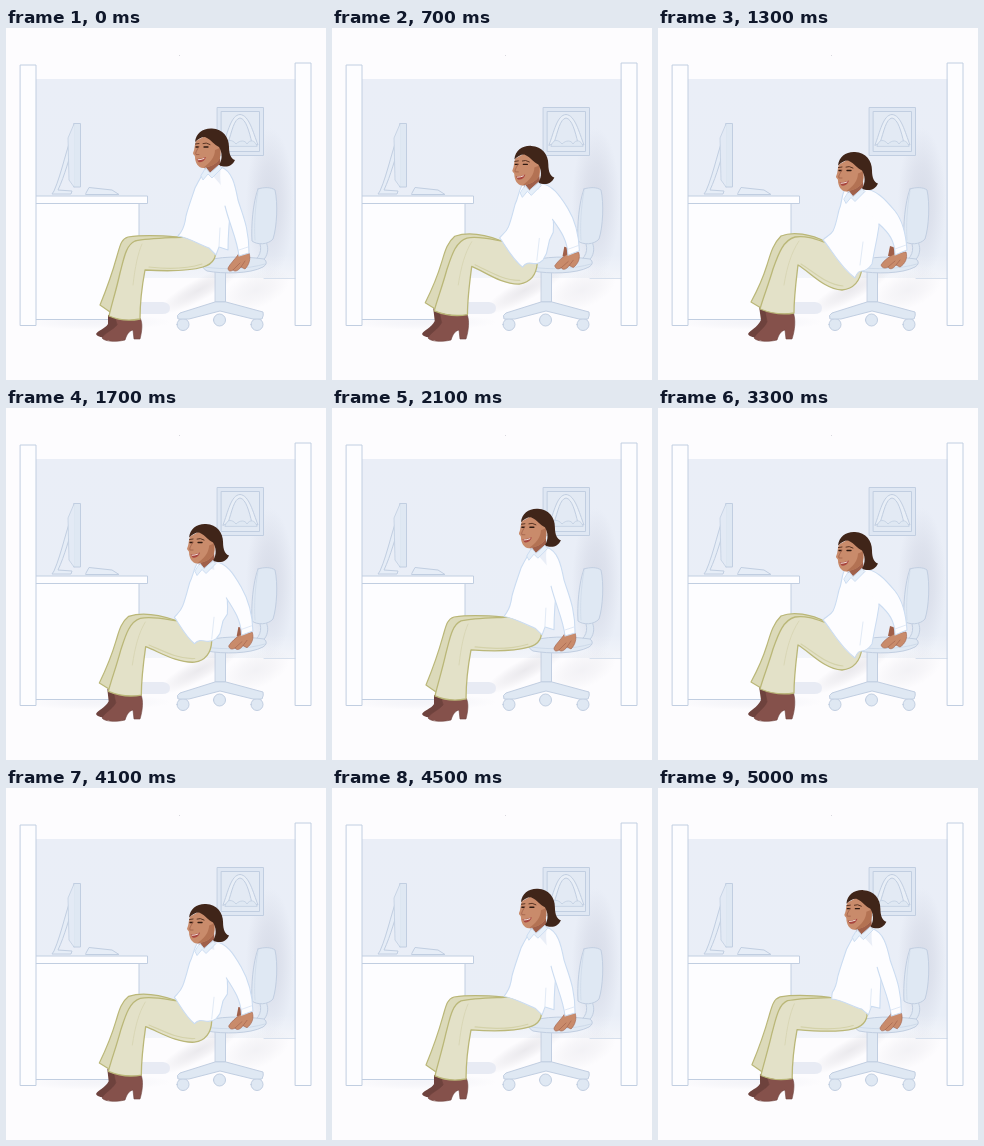
An HTML page with a canvas that plays this animation: 320x352 px, repeating every 5100 ms.

```html
<!DOCTYPE html>
<html lang="en">
<head>
<meta charset="utf-8">
<title>Chair dip</title>
<style>
html, body { margin: 0; width: 100%; height: 100%; overflow: hidden; background: #fdfcfe; }
canvas { display: block; width: 320px; height: 352px; }
</style>
</head>
<body>
<canvas id="stage"></canvas>
<script>
const canvas = document.getElementById('stage');
const ctx = canvas.getContext('2d');
const ratio = window.devicePixelRatio || 1;
canvas.width = 320 * ratio;
canvas.height = 352 * ratio;

const LOOP = 5100, STEP = 100, CYCLE = 2400;
const LINE = '#c1cee1', PALE = '#dfe8f3', WHITE = '#fdfdff';
const SKIN = '#c98b6b', SKIN_DARK = '#a0604a', HAIR = '#402519';
const PANTS = '#e3e1c8', SEAM = '#bab778', BOOT = '#85514b', BOOT_DARK = '#6e423d';
const SHIRT_LINE = '#cbdcf1';

// [time within a cycle, how far the body is lowered]
const DIP = [[0, 0], [200, .07], [400, .29], [600, .57], [700, .74], [800, .9], [900, 1],
  [1300, 1], [1500, .88], [1700, .66], [1800, .47], [1950, .17], [2100, .01], [2400, 0]];

function dipAt(ms) {
  const t = ms % CYCLE;
  const i = DIP.findIndex(k => k[0] > t);
  const [t0, d0] = DIP[i - 1], [t1, d1] = DIP[i];
  return d0 + (d1 - d0) * (t - t0) / (t1 - t0);
}

// Blend two path strings that share the same commands.
function morph(up, down, d) {
  const ends = down.match(/-?[\d.]+/g);
  let i = 0;
  return up.replace(/-?[\d.]+/g, n => (+n + (ends[i++] - n) * d).toFixed(2));
}

function shape(path, fill, stroke, width = 1) {
  const p = new Path2D(path);
  if (fill) { ctx.fillStyle = fill; ctx.fill(p); }
  if (stroke) { ctx.strokeStyle = stroke; ctx.lineWidth = width; ctx.stroke(p); }
}

function box(x, y, w, h, fill, stroke = LINE) {
  shape(`M${x} ${y}h${w}v${h}h${-w}Z`, fill, stroke);
}

function disc(x, y, r, fill, stroke = LINE) {
  shape(`M${x - r} ${y}a${r} ${r} 0 1 0 ${2 * r} 0a${r} ${r} 0 1 0 ${-2 * r} 0Z`, fill, stroke);
}

function haze(x, y, rx, ry, angle, rgb, alpha) {
  ctx.save();
  ctx.translate(x, y);
  ctx.rotate(angle);
  ctx.scale(rx, ry);
  const g = ctx.createRadialGradient(0, 0, 0, 0, 0, 1);
  g.addColorStop(0, `rgba(${rgb},${alpha})`);
  g.addColorStop(.5, `rgba(${rgb},${alpha * .6})`);
  g.addColorStop(1, `rgba(${rgb},0)`);
  ctx.fillStyle = g;
  ctx.fillRect(-1, -1, 2, 2);
  ctx.restore();
}

function drawRoom() {
  ctx.fillStyle = '#fdfcfe';
  ctx.fillRect(0, 0, 320, 352);
  const wall = ctx.createLinearGradient(0, 51, 0, 251);
  wall.addColorStop(0, '#eaeef7');
  wall.addColorStop(.88, '#e9eef7');
  wall.addColorStop(1, '#f3f5fa');
  ctx.fillStyle = wall;
  ctx.fillRect(30, 51, 260, 199);
  ctx.fillStyle = '#d8d8de';
  ctx.fillRect(173, 27, 1, 1);

  ctx.save();
  ctx.beginPath();
  ctx.rect(30, 51, 260, 260);
  ctx.clip();
  haze(264, 175, 24, 75, 0, '196,200,216', .5);
  haze(193, 262, 46, 11, -.5, '185,183,192', .27);
  haze(250, 262, 36, 18, -.4, '200,200,210', .2);
  ctx.restore();
  haze(90, 294, 75, 8, 0, '205,210,225', .2);
  shape('M258 250.5H290', null, '#d6dfec');

  // picture on the wall
  box(211.5, 79.5, 46, 48, '#dfe7f3');
  box(215.5, 83.5, 38, 40, '#e3eaf4');
  shape('M217 117C222 104 225 87 234 86.5C243 87 247 104 252 117L246 115C243 103 240 91 234 90C228 91 226 103 222 115Z', '#e9eff7', LINE);
  shape('M219 118C221 111 226 111 230 116C234 112 239 112 241 116C244 111 249 112 251 118Z', PALE, LINE, .8);

  // desk
  shape('M133 274H157Q164 275 164 280Q164 286 156 286H133Z', '#e8ebf4');
  box(29.5, 175.5, 103.5, 116, WHITE);
  box(29.5, 168, 112, 7.5, WHITE);

  // monitor and keyboard
  shape('M67 106C61 117 56 145 48 163L46 166H65L66 163L52 162C59 147 63 130 67 119Z', '#e6edf7', LINE);
  shape('M68 95.5H74.5V159H68Z', PALE, LINE);
  shape('M68 96L62 110L63 152L68 159', '#e3eaf5', LINE, .8);
  shape('M80 165L83 159.5L106 162L113 166.5H80Z', '#e6edf7', LINE);

  box(14.5, 37, 15.5, 260.5, WHITE);
  box(289.5, 35, 15.5, 262.5, WHITE);
}

function drawChair() {
  shape('M259 212C265 222 261 232 249 239L244 236C254 230 257 222 253 213Z', PALE, LINE);
  shape('M252 161C258 159 265 159 269 162C272 175 271 199 267 211C262 217 251 217 246 213C245 198 247 174 252 161Z', PALE, LINE);
  shape('M252 163C249 180 248 197 249 212', null, '#cfdbea', .8);
  shape('M209.5 243H219.5V274H209.5Z', PALE, LINE);
  disc(177, 296.5, 6, PALE);
  disc(213.5, 292, 6, PALE);
  disc(251, 296.5, 6, PALE);
  shape('M209 274L174 285Q170 287 172 291H183L214 283L247 291H256Q258 287 257 284L220 274Z', PALE, LINE);
  shape('M197 234C210 228 237 228 258 231Q263 235 257 239C244 246 217 246 201 243Q195 240 197 234Z', PALE, LINE);
  shape('M199 239C218 242 242 241 259 236', null, '#cad7e8', .8);
}

function drawLegs(blend) {
  // far boot, near boot
  shape(blend(
    'M102 287L117 289L115 304L106 307C99 310 92 310 90 306C92 302 99 301 102 296Z',
    'M101 278L117 281L115 303L106 307C99 310 92 310 90 306C92 302 99 300 103 292Z'), BOOT_DARK);
  shape(blend(
    'M109 289L134 290C137 295 136 303 134 311L128 311L127 302C123 303 121 306 119 312C111 314 99 314 96 310C98 305 107 302 111 297Z',
    'M107 282L135 284C138 291 137 302 134 311L128 311L127 302C123 303 121 306 119 312C111 314 99 314 96 310C98 305 106 301 109 294Z'), BOOT, BOOT_DARK, .6);
  // far leg, near leg
  shape(blend(
    'M172 209C150 207 135 207 122 209C115 211 114 218 111 228C106 246 101 260 94 277L104 284L134 260L139 218Z',
    'M168 214C153 206 135 203 123 208C114 217 112 228 109 237C105 250 99 263 93 274L103 280L134 258L140 218Z'), '#dcdaba', SEAM, 1.2);
  shape(blend(
    'M178 209C160 210 142 210 129 213C120 217 118 230 114 245C110 263 106 275 103 288C112 292 124 293 134 291C134 275 136 258 139 242C155 243 180 244 197 239C208 236 211 228 209 220Z',
    'M169 215C160 212 149 207 137 209C125 212 120 227 115 241C110 258 105 270 102 281C112 285 125 287 136 285C136 268 138 254 140 237C152 244 166 261 184 262C194 261 202 255 204 240Z'), PANTS, SEAM, 1.3);
  shape(blend('M136 216C132 225 129 239 127 257', 'M141 213C133 225 129 239 126 257'), null, '#d6d4b0', .8);
  shape(blend('M143 239C160 241 180 241 196 236', 'M143 236C156 244 169 257 185 258'), null, '#d4d2aa', 1.2);
}

function drawTorso(blend) {
  shape(blend('M233 221L239 221L240 230L232 229Z', 'M232 218L238 220L239 229L230 228Z'), SKIN_DARK);
  shape(blend(
    'M201 141C196 146 193 152 189 160C185 172 182 180 180 188C179 196 177 201 175 204C174 206 173 206 172 208C184 210 194 217 203 220L210 227L213 219L222 222C222 205 224 185 226 170C228 150 224 141 215 138Z',
    'M186 163C183 170 184 176 181 182C179 190 178 197 175 203C172 208 168 208 165 212C172 219 181 238 197 250L202 237L205 249L214 236C216 225 219 210 221 198C223 175 215 163 205 160Z'), WHITE, SHIRT_LINE, 1.1);
  shape(blend('M214 200L213 219', 'M205 214L202 237'), null, '#e1eaf6', 1);
}

function drawArm(blend) {
  shape(blend(
    'M232 227L243 225C245 231 243 237 239 241L235 239C232 243 229 244 227 242C224 244 222 243 222 240C224 236 229 231 232 227Z',
    'M236 226L248 224C250 230 247 236 242 239L238 237C235 241 232 242 230 239C227 241 224 240 223 237C226 232 231 229 236 226Z'), SKIN, SKIN_DARK, .6);
  shape(blend('M227 242L234 235M235 239L239 233', 'M230 239L237 233M238 237L242 232'), null, SKIN_DARK, .6);
  const outer = blend(
    'M215 139C226 143 229 156 232 172C237 188 243 200 243 225L233 228C231 211 224 198 219 178',
    'M205 161C218 161 227 171 237 183C245 193 248 207 249 222L237 227C237 213 231 205 221 196');
  const shoulder = blend('C215 162 213 149 215 139Z', 'C211 187 203 172 205 161Z');
  shape(outer + shoulder, WHITE);
  shape(outer, null, SHIRT_LINE, 1.1);
  shape(blend('M233 222L242 219', 'M237 221L248 217'), null, '#d8e4f4', .8);
}

function drawHead(d) {
  ctx.save();
  ctx.translate(-9 * d, 23.5 * d);
  shape('M198 135L214 130L215 141L204 146L199 142Z', SKIN_DARK);
  shape('M190 113C188 119 189 121 187 125C187 127 189 127 189 129C189 134 192 140 197 140C204 139 211 136 214 130C217 120 212 109 201 107Z', SKIN);
  shape('M209 122C209 129 204 135 197 140C204 139 211 136 214 130L214 120Z', '#b37253');
  shape('M189 114C190 105 197 100 206 100.5C217 101 223 109 223 119C223 126 225 131 229 132C226 139 219 140 213 137C217 131 216 124 213 119C208 117 206 112 199 109C195 109 192 111 189 114Z', HAIR);
  shape('M189.5 116L193 115.5M197 115.5Q200 114 204 116.5', null, '#5a3524', 1);
  shape('M190 119H192.5M198 119H202', null, '#2f1a12', 1.3);
  shape('M193 118.5C191 122 189 125 190 126.5L193 126.5', null, SKIN_DARK, .8);
  shape('M190.5 131Q195 131 200 129Q198 135 192.5 134Z', '#a8453f');
  shape('M192 131.8Q195 131.8 198 130.5', null, '#f3e2d8', 1);
  // collar
  shape('M200 140L204 145L213 137L216 140L206 150L202 146L197 152L195 148Z', '#e6eff9', SHIRT_LINE, .9);
  ctx.restore();
}

function draw(ms) {
  const d = dipAt(ms);
  const blend = (up, down) => morph(up, down, d);
  ctx.setTransform(ratio, 0, 0, ratio, 0, 0);
  ctx.lineJoin = ctx.lineCap = 'round';
  drawRoom();
  drawChair();
  drawLegs(blend);
  drawTorso(blend);
  drawArm(blend);
  drawHead(d);
}

const start = performance.now();
function tick() {
  const ms = (performance.now() - start) % LOOP;
  draw(Math.floor(ms / STEP) * STEP);
  requestAnimationFrame(tick);
}
tick();
</script>
</body>
</html>
```
